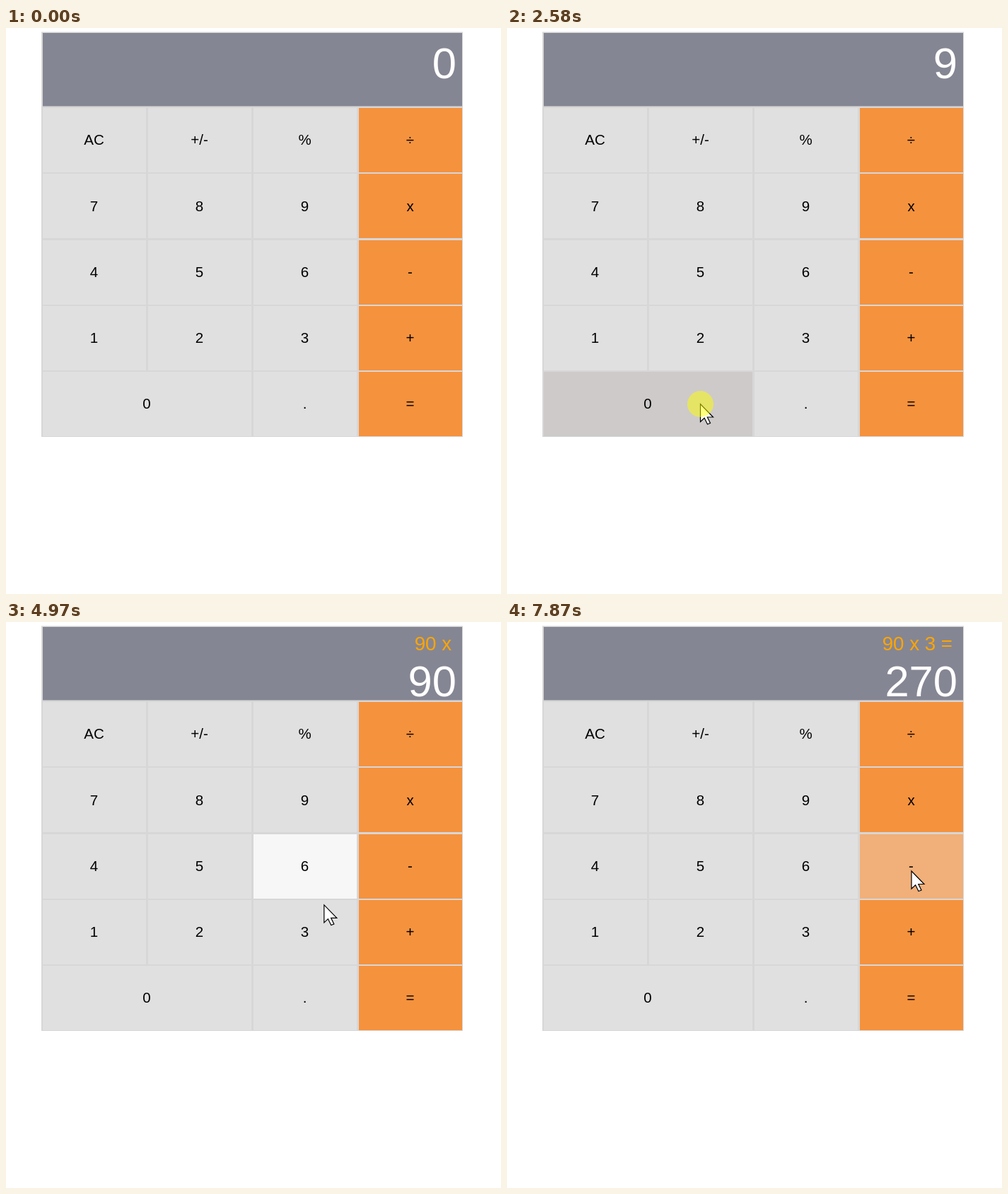
Write an HTML page that moves like this. It is 700 px wide and 800 px high and loops after 8000 ms.

```html
<!DOCTYPE html>
<html lang="en">
<head>
<meta charset="utf-8">
<title>Calculator</title>
<style>
  html, body { margin: 0; width: 100%; height: 100%; overflow: hidden; background: #fff; }
  svg { display: block; width: 700px; height: 800px; font-family: "Liberation Sans", Arial, sans-serif; }
</style>
</head>
<body>
<svg id="stage" viewBox="0 0 700 800">
  <rect x="50" y="5.5" width="596" height="572.5" fill="#d7d7d7"/>
  <rect x="52" y="7" width="593" height="103.5" fill="#858693"/>
  <text id="history" x="630" y="40" font-size="27.7" text-anchor="end" fill="#ffa500"></text>
  <text id="value" x="637" font-size="61.5" text-anchor="end" fill="#fff"></text>
  <g id="keys" font-size="20.5" text-anchor="middle"></g>
  <g id="pointer">
    <path d="M0 0V25L5.6 19.8L10 28.6L14 27L9.8 18.5H18Z" fill="#fff" stroke="#000" stroke-width="1.2"/>
    <circle id="press" r="18.5" fill="#ff0" fill-opacity=".5"/>
  </g>
</svg>
<script>
const LOOP = 8000;
const STEP = 70;    // pointer refresh
const PAUSE = 270;  // from arrival to press
const HOLD = 130;   // from press to release
const COL = 149, ROW = 93.25;
const NS = "http://www.w3.org/2000/svg";
const $ = id => document.getElementById(id);

const ROWS = ["AC +/- % ÷", "7 8 9 x", "4 5 6 -", "1 2 3 +", "0 0 . ="].map(r => r.split(" "));
const GREY = { idle: "#e0e0e0", hover: "#f7f7f7", active: "#cecaca" };
const ORANGE = { idle: "#f5923e", hover: "#f1af79", active: "#e8842c" };
const OPS = {
  "÷": (a, b) => a / b, "x": (a, b) => a * b,
  "-": (a, b) => a - b, "+": (a, b) => a + b
};

const START = [757, 690];
const VISITS = [
  { go: 330, arrive: 400, at: [559, 590] },
  { go: 670, arrive: 1350, at: [410.5, 272.5], via: [430, 610] },
  { go: 1770, arrive: 2310, at: [273.5, 531.5] },
  { go: 3040, arrive: 3830, at: [600, 248] },
  { go: 4600, arrive: 5100, at: [422, 428] },
  { go: 5790, arrive: 6150, at: [534.5, 515] },
  { go: 7440, arrive: 7870, at: [572, 352] }
];

function keyAt([x, y]) {
  const row = ROWS[Math.floor((y - 112) / ROW)];
  return row && row[Math.floor((x - 50) / COL)];
}

VISITS.forEach((v, i) => {
  const from = i ? VISITS[i - 1].at : START;
  v.path = v.via ? [from, v.via, v.at] : [from, v.at];
  v.steps = Math.round((v.arrive - v.go) / STEP);
  v.key = keyAt(v.at);
  v.press = v.arrive + PAUSE;
  v.release = v.press + HOLD;
});

function add(parent, tag, attrs, text = "") {
  const el = document.createElementNS(NS, tag);
  for (const name in attrs) el.setAttribute(name, attrs[name]);
  el.textContent = text;
  return parent.appendChild(el);
}

const keys = {};
ROWS.forEach((row, r) => row.forEach((label, c) => {
  if (keys[label]) return;
  const span = row.filter(other => other === label).length;
  const x = 52 + c * COL, y = 113.2 + r * ROW;
  const width = span * COL - 3;
  const skin = c === 3 ? ORANGE : GREY;
  const rect = add($("keys"), "rect", { x, y: Math.round(y), width, height: 91 });
  add($("keys"), "text", { x: x + width / 2 - 0.5, y: y + 52.2 }, label);
  keys[label] = { rect, skin };
}));

// Eased point on a line or a quadratic curve
function along(points, p) {
  const s = p * p * (3 - 2 * p);
  const mix = (a, b) => a.map((v, i) => v + (b[i] - v) * s);
  while (points.length > 1) points = points.slice(1).map((b, i) => mix(points[i], b));
  return points[0];
}

// Hover trails the pointer by one step
function pointerAt(visit, t) {
  const { go, arrive, steps, path } = visit;
  const i = Math.min(steps, Math.floor((t - go) / (arrive - go) * steps + 1e-6));
  return {
    at: along(path, (i + 1) / (steps + 1)),
    over: keyAt(along(path, i / (steps + 1)))
  };
}

// Works through every key released so far
function readout(t) {
  let value = "0", history = "", fresh = true;
  for (const { key, release } of VISITS) {
    if (!key || t < release) continue;
    if (/\d/.test(key)) {
      value = fresh ? key : value + key;
      fresh = false;
      continue;
    }
    if (key === "=") {
      const [a, op] = history.split(" ");
      history += ` ${value} =`;
      value = String(OPS[op](+a, +value));
    } else {
      history = `${value} ${key}`;
    }
    fresh = true;
  }
  return { value, history };
}

function draw(t) {
  const { value, history } = readout(t);
  $("value").textContent = value;
  $("value").setAttribute("y", history ? 105 : 70.5);
  $("history").textContent = history;

  const visit = VISITS.filter(v => t >= v.go).pop();
  const pointer = visit && pointerAt(visit, t);
  const pressed = visit && visit.key && t >= visit.press && t < visit.release;
  $("pointer").setAttribute("visibility", pointer ? "visible" : "hidden");
  if (pointer) $("pointer").setAttribute("transform", `translate(${pointer.at})`);
  $("press").setAttribute("display", pressed ? "inline" : "none");

  for (const label in keys) {
    const { rect, skin } = keys[label];
    const over = pointer && pointer.over === label;
    rect.setAttribute("fill", over ? (pressed ? skin.active : skin.hover) : skin.idle);
  }
}

const began = performance.now();
function tick() {
  draw((performance.now() - began) % LOOP);
  requestAnimationFrame(tick);
}
draw(0);
requestAnimationFrame(tick);
</script>
</body>
</html>
```
